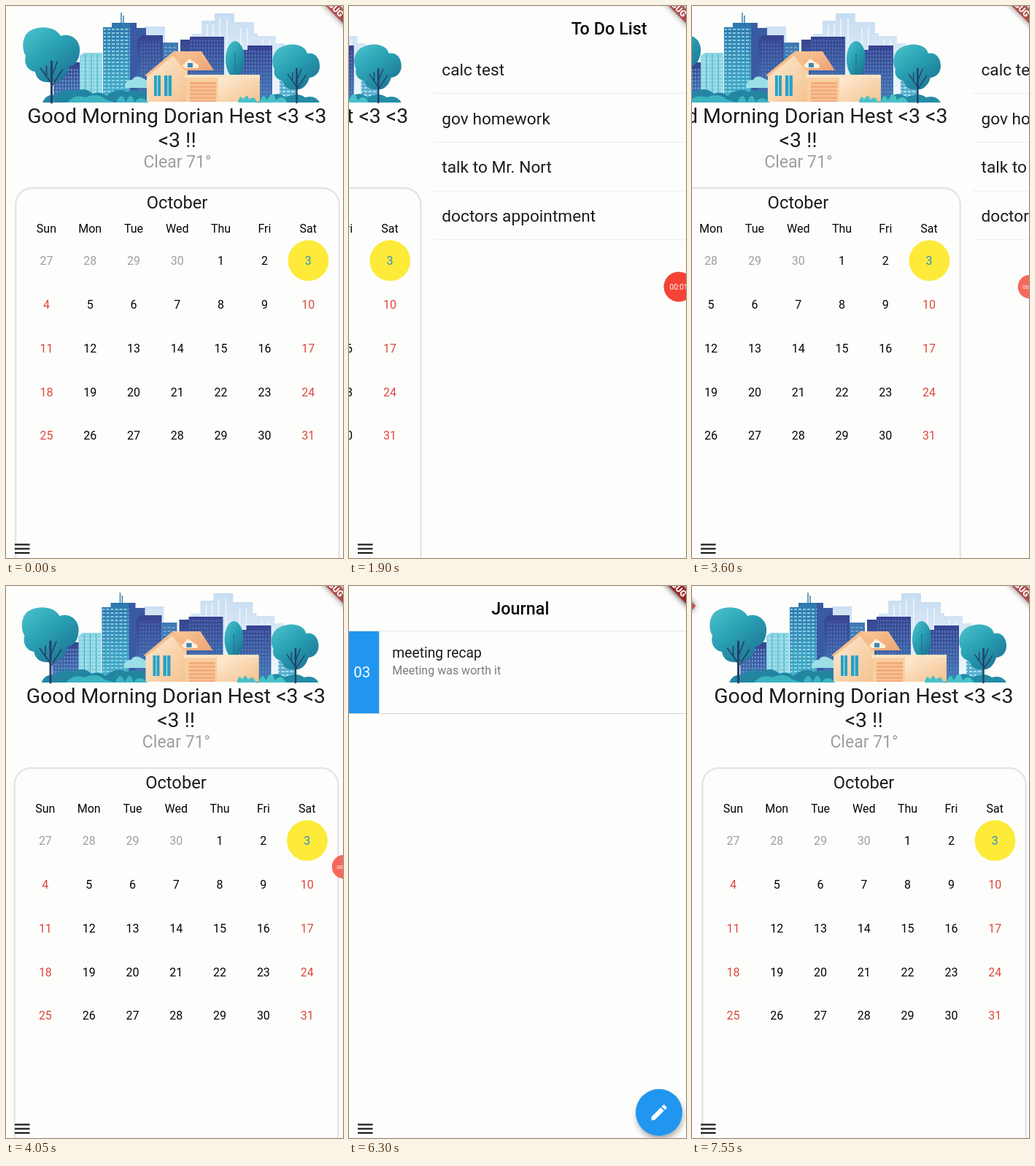
Recreate the animation shown at these times as an HTML page. Size 462x755 px, loop 7600 ms.

```html
<!DOCTYPE html>
<html lang="en">
<head>
<meta charset="utf-8">
<title>Planner</title>
<style>
  html, body { margin: 0; width: 100%; height: 100%; overflow: hidden; background: #fdfefc; }
  svg { display: block; width: 100%; height: 100%; }
  text { font-family: Roboto, sans-serif; fill: #1c1c1c; }
  .mid { text-anchor: middle; }
  .title { font-size: 23.4px; font-weight: 500; fill: #0c0c0c; }
  .item { font-size: 22.7px; }
  .cal { font-size: 16px; fill: #050505; }
  .out { fill: #9e9e9e; }
  .end { fill: #dd473d; }
  .today { fill: #2d8fd0; }
</style>
</head>
<body>
<svg viewBox="0 0 462 755" preserveAspectRatio="none">
  <defs>
    <linearGradient id="leaf" x1="0" y1="0" x2=".8" y2="1">
      <stop offset="0" stop-color="#4cc3cc"/><stop offset=".45" stop-color="#2ba3b5"/><stop offset="1" stop-color="#1b7394"/>
    </linearGradient>
    <linearGradient id="tower" x1="0" y1="0" x2="0" y2="1">
      <stop offset="0" stop-color="#2f77ae"/><stop offset="1" stop-color="#45b3cb"/>
    </linearGradient>
    <linearGradient id="navy" x1="0" y1="0" x2="0" y2="1">
      <stop offset="0" stop-color="#37438f"/><stop offset="1" stop-color="#4379b8"/>
    </linearGradient>
    <linearGradient id="haze" x1="0" y1="0" x2="0" y2="1">
      <stop offset="0" stop-color="#c6dcf2"/><stop offset="1" stop-color="#f1f7fc"/>
    </linearGradient>
    <linearGradient id="wall" x1="0" y1="0" x2="1" y2="1">
      <stop offset="0" stop-color="#fdebd3"/><stop offset="1" stop-color="#f4c28f"/>
    </linearGradient>
    <linearGradient id="roof" x1="0" y1="0" x2="1" y2="1">
      <stop offset="0" stop-color="#f9c797"/><stop offset="1" stop-color="#eda274"/>
    </linearGradient>
    <pattern id="slots" width="6" height="5" patternUnits="userSpaceOnUse">
      <rect x="1" y="1" width="4" height="2" fill="#a9e3ee"/>
    </pattern>
    <pattern id="panes" width="4" height="5" patternUnits="userSpaceOnUse">
      <rect x="1" y="1" width="1.6" height="3" fill="#6d9bd2"/>
    </pattern>
    <filter id="soft" x="-30%" y="-150%" width="160%" height="400%"><feGaussianBlur stdDeviation="4"/></filter>
    <filter id="lift" x="-30%" y="-30%" width="160%" height="160%"><feGaussianBlur stdDeviation="4"/></filter>
    <g id="banner" transform="translate(475.5 -29) rotate(45)">
      <rect x="-46.8" y="32.8" width="93.6" height="14" opacity=".5" filter="url(#soft)"/>
      <rect x="-46.8" y="32.8" width="93.6" height="14" fill="#b71c1c" opacity=".63"/>
      <text class="mid" y="44.1" font-size="12" font-weight="900" style="fill:#fff">DEBUG</text>
    </g>
    <g id="trunk" fill="none" stroke="#243f68" stroke-linecap="round">
      <path d="M0 0V-56" stroke-width="3"/>
      <path d="M0 -26L-15 -47M0 -22L15 -45M-7 -36V-50M0 -36L8 -56" stroke-width="1.6"/>
    </g>
  </defs>

  <g id="home">
    <g id="city">
      <path fill="url(#haze)" d="M190 28h28v60h-28zM255 38h13V20h18V10h27v12h27v15h5v4h25v10h12v75H255z"/>
      <path d="M276 25v60M284 25v60M293 17v60M303 17v60M322 30v50M331 30v50M352 46v50M361 46v50" stroke="#edf4fb" stroke-width="1.6"/>

      <path d="M65 82h22v-5h16v52H65z" fill="url(#navy)"/>
      <path d="M65 84h38v44H65z" fill="url(#panes)"/>
      <path d="M101 68l6 -4h25v64h-31z" fill="#8bd5e3"/>
      <path d="M101 68h31v60h-31z" fill="url(#slots)"/>
      <path d="M109 66v62M117 66v62M125 66v62" stroke="#4aa9c4"/>

      <path d="M158 24V9M161 24V13" stroke="#3f7fae" stroke-width="1.5"/>
      <path d="M133 29h12v-6h29v105h-41z" fill="url(#tower)"/>
      <path d="M134 30h36v96h-36z" fill="url(#slots)" opacity=".75"/>
      <path d="M170 23h9v7h13v98h-22z" fill="#3a5ba3"/>
      <path d="M180 46l6 -6h29v88h-35z" fill="url(#navy)"/>
      <path d="M183 48h30v50h-30z" fill="url(#panes)" opacity=".45"/>
      <path d="M215 50h21v55h-21z" fill="#4179b5"/>
      <path d="M217 53h18v50h-18z" fill="url(#slots)" opacity=".4"/>
      <path d="M239 46h13v-4h47v85h-60z" fill="url(#navy)"/>
      <path d="M252 46h46v70h-46z" fill="url(#panes)" opacity=".5"/>
      <path d="M322 60h9v-6h34v77h-43z" fill="url(#navy)"/>
      <path d="M324 61h39v66h-39z" fill="url(#panes)" opacity=".6"/>
      <path d="M375 96h24v36h-24z" fill="#5aaed0"/>
      <path d="M375 98h24v32h-24z" fill="url(#slots)"/>

      <ellipse cx="314" cy="73" rx="13" ry="25" fill="url(#leaf)"/>
      <path d="M314 65v32" stroke="#1f7796" stroke-width="1.3"/>

      <path d="M163 109q2 -9 10 -8q4 -7 13 -3l8 4v10h-31z" fill="#9bdfe7"/>
      <path d="M50 132q5 -13 19 -10q10 -12 25 -5q14 -7 25 3q11 -4 19 3q12 -12 29 -6q14 -5 28 4v11z" fill="#2385a2"/>
      <path d="M84 132q10 -12 25 -7q16 -7 28 3l13 4zM151 132q8 -18 13 0q8 -18 12 0q9 -12 19 0z" fill="#3bb4c0"/>
      <path d="M340 132q8 -14 21 -8q12 -8 22 1q17 -8 27 0q14 -4 20 7z" fill="#238ca7"/>
      <path d="M348 132q4 -16 10 -3q8 -17 12 0q10 -10 15 3z" fill="#48c1c9"/>

      <path d="M193 94l39 -29l17 23v43h-56z" fill="url(#wall)"/>
      <path d="M230 62h38l17 26h-36z" fill="url(#roof)"/>
      <path d="M190 95l40 -33l20 26h-5l-16 -20l-35 28z" fill="#f6bd8b"/>
      <path d="M242 82l9 -10l13 9v4h-18z" fill="#fff0d9"/>
      <path d="M249 78h7v6h-7z" fill="#4187b0"/>
      <path d="M203 95h9v28h-9zM217 95h10v28h-10z" fill="#2d9fc0"/>
      <path d="M207.500 95v28M222 95v28" stroke="#b7e7ed" stroke-width="1.2"/>
      <path d="M247 96h101v35H247z" fill="#f9cfa0"/>
      <path d="M245 94h103v4H245z" fill="#ffe4c2"/>
      <path d="M291 98h57v33h-57z" fill="url(#wall)"/>
      <path d="M252 104h36v27h-36z" fill="#f2ac7b"/>
      <path d="M252 108h36M252 113h36M252 118h36M252 123h36M252 128h36" stroke="#fbcda2" stroke-width="1.3"/>
      <path d="M318 132q3 -13 7 -4q6 -10 8 0q8 -7 11 4z" fill="#48c1c9"/>

      <path d="M37 32C48 27 68 28 75 41C89 36 103 47 101 63C100 76 93 82 86 83C84 96 74 106 62 104C49 106 41 99 40 90C29 88 24 78 27 68C20 56 23 36 37 32z" fill="url(#leaf)"/>
      <use href="#trunk" transform="translate(62.500 132)"/>
      <path d="M380 55C391 50 410 52 413 65C424 62 431 73 430 84C429 93 423 97 416 98C413 109 405 116 396 114C387 116 380 109 379 102C370 101 366 93 368 86C362 74 367 59 380 55z" fill="url(#leaf)"/>
      <use href="#trunk" transform="translate(398.500 132) scale(.82)"/>
    </g>
    <g class="mid">
      <text x="234.400" y="159.800" font-size="28.400">Good Morning Dorian Hest &lt;3 &lt;3</text>
      <text x="234.700" y="192.800" font-size="28.400">&lt;3 !!</text>
      <text x="235" y="221" font-size="23" class="out">Clear 71°</text>
    </g>
    <rect x="13.200" y="249" width="443.600" height="560" rx="23" fill="#fdfefc" stroke="#e5e5e6" stroke-width="2.500"/>
    <text class="mid" x="234.500" y="277.300" font-size="23.700">October</text>
    <circle cx="414.500" cy="348.200" r="27.900" fill="#fdea39"/>
    <g id="month" class="mid"></g>
  </g>

  <g id="todo">
    <text class="title mid" x="715" y="38.500">To Do List</text>
  </g>

  <g id="journal">
    <path d="M-6 61.700H476" stroke="#e4e4e4"/>
    <rect x="-6" y="62" width="47.300" height="112" fill="#2196f0"/>
    <text class="mid" x="17.700" y="125.300" font-size="20.500" style="fill:#fff">03</text>
    <text class="title mid" x="234.800" y="38.500">Journal</text>
    <text x="59.300" y="98.300" font-size="19.300">meeting recap</text>
    <text x="59.300" y="121" font-size="16" style="fill:#7c7c7c">Meeting was worth it</text>
    <path d="M-6 174.500H476" stroke="#d6d6d6"/>
    <circle cx="426" cy="725" r="31" opacity=".38" filter="url(#lift)"/>
    <circle cx="425" cy="720" r="32" fill="#2196f0"/>
    <path transform="translate(411 706) scale(1.170)" fill="#fff" d="M3 17.250V21h3.750L17.810 9.940l-3.750-3.750zM20.710 7.040c.39-.39.39-1.020 0-1.410l-2.340-2.340c-.39-.39-1.020-.39-1.410 0l-1.830 1.830 3.750 3.750z"/>
    <use href="#banner"/>
  </g>

  <path d="M12 736.700h20.500M12 742.400h20.500M12 748.100h20.500" stroke="#1d1d1d" stroke-width="2.300"/>
  <g id="bubble">
    <circle r="20.500" fill="#f44336"/>
    <text id="clock" class="mid" y="3.600" font-size="10" style="fill:#fff"></text>
  </g>
  <use href="#banner"/>
</svg>
<script>
const LOOP = 7600, PAGE = 481;
const $ = id => document.getElementById(id);

function add(parent, tag, attrs, text) {
  const el = document.createElementNS('http://www.w3.org/2000/svg', tag);
  for (const k in attrs) el.setAttribute(k, attrs[k]);
  if (text !== undefined) el.textContent = text;
  parent.appendChild(el);
}

// calendar, starting on Sunday 27 September
const colX = c => 55.4 + c * 59.8;
['Sun', 'Mon', 'Tue', 'Wed', 'Thu', 'Fri', 'Sat'].forEach((name, c) =>
  add($('month'), 'text', { class: 'cal', x: colX(c), y: 310.2 }, name));
for (let i = 0; i < 35; i++) {
  const c = i % 7, day = i < 4 ? 27 + i : i - 3;
  const kind = i < 4 ? 'out' : day === 3 ? 'today' : c % 6 ? '' : 'end';
  add($('month'), 'text', { class: 'cal ' + kind, x: colX(c), y: 353.8 + Math.floor(i / 7) * 59.9 }, day);
}

['calc test', 'gov homework', 'talk to Mr. Nort', 'doctors appointment'].forEach((task, i) => {
  const y = i * 66.8;
  add($('todo'), 'text', { class: 'item', x: 485.6, y: 94.8 + y }, task);
  add($('todo'), 'path', { d: `M474 ${119.5 + y}h481`, stroke: '#ebebeb' });
});

// overdamped spring from rest: 0 to 1
function spring(ms) {
  if (ms <= 0) return 0;
  const s = ms / 1000, a = 9.07, b = 22;
  return 1 - (b * Math.exp(-a * s) - a * Math.exp(-b * s)) / (b - a);
}

function ramp(t, from, to) {
  const p = Math.min(1, Math.max(0, (t - from) / (to - from)));
  return p * p * (3 - 2 * p);
}

const swipes = [[1695, -1], [3358.5, 1], [4420, 1], [6811, -1]];
const scroll = t => PAGE * swipes.reduce((sum, [start, dir]) => sum + dir * spring(t - start), 0);

function place(id, x, shown) {
  $(id).setAttribute('transform', `translate(${x.toFixed(2)} 0)`);
  $(id).style.display = shown ? '' : 'none';
}

function draw(t) {
  const x = scroll(t);
  place('home', x, Math.abs(x) < PAGE - 0.1);
  place('todo', x, x < 0);
  place('journal', x - PAGE, x > 0.1);

  const dim = ramp(t, 2950, 3200);
  const bx = 486 - 34 * ramp(t, 900, 1150) + 11 * dim + 18 * ramp(t, 4700, 5250);
  const bubble = $('bubble');
  bubble.setAttribute('transform', `translate(${bx} 384) scale(${1 - 0.21 * dim})`);
  bubble.setAttribute('opacity', 1 - 0.2 * dim);
  bubble.style.display = t > 900 && t < 5250 ? '' : 'none';
  $('clock').textContent = '00:0' + Math.max(0, Math.floor((t - 800) / 1000));
}

function tick() {
  draw(performance.now() % LOOP);
  requestAnimationFrame(tick);
}
tick();
</script>
</body>
</html>
```
